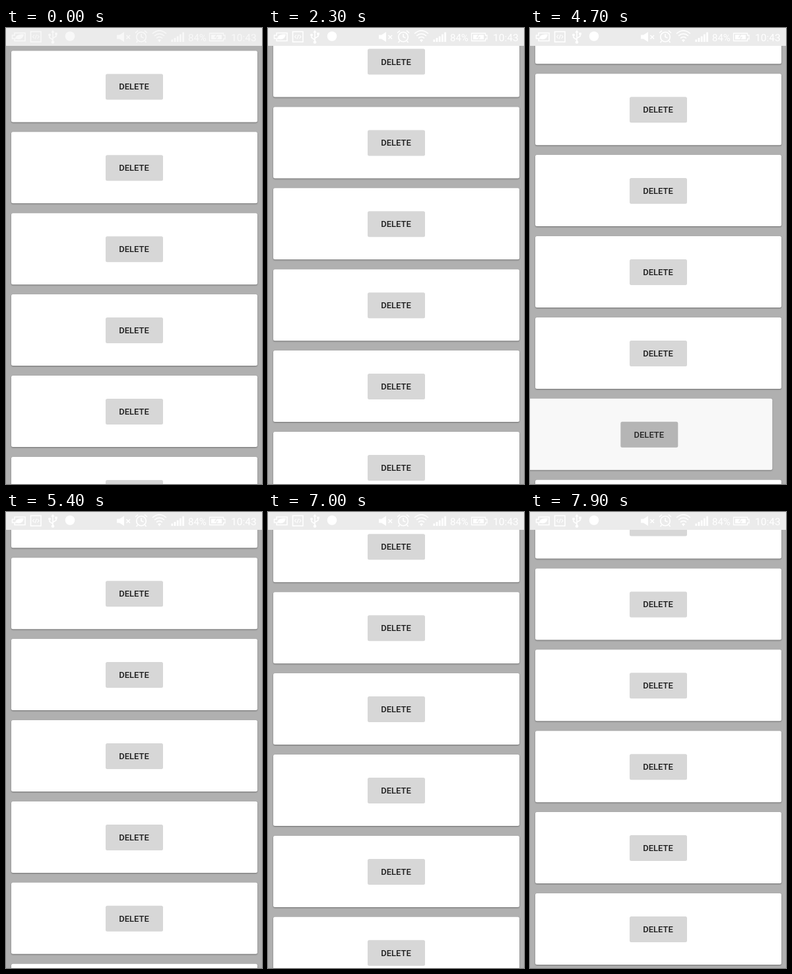
An HTML page that plays this animation: 388x690 px, repeating every 8 s.

```html
<!DOCTYPE html>
<html lang="en">
<head>
<meta charset="utf-8">
<title>Card list</title>
<style>
  html, body { margin: 0; width: 100%; height: 100%; overflow: hidden; background: #b0b0b0; }
  #stage { position: relative; width: 388px; height: 690px; overflow: hidden; background: #b0b0b0; }
  .card {
    --a: 1; --ink: 1; --grey: 215;
    position: absolute; left: 7.5px; top: 0; width: 373px; height: 108px; border-radius: 2.5px;
    background: rgba(255, 255, 255, var(--a));
    box-shadow: 0 1px 2px rgba(0, 0, 0, calc(var(--a) * .38));
  }
  .button {
    position: absolute; left: 143px; top: 34.8px; width: 87px; height: 39.5px; border-radius: 2.5px;
    background: rgba(var(--grey), var(--grey), var(--grey), var(--a));
    color: rgba(28, 28, 28, var(--ink));
    font: 500 13px/39.5px Roboto, sans-serif; text-align: center;
  }
  #bar { position: absolute; left: 0; top: 0; background: #ebebeb; }
  #bar text { font-family: Roboto, sans-serif; fill: #fff; stroke: none; }
</style>
</head>
<body>
<div id="stage">
  <div id="list"></div>
  <svg id="bar" width="388" height="27" viewBox="0 0 388 27">
    <g id="icons" fill="none" stroke="#fff" stroke-width="1.6">
      <!-- power saver -->
      <path d="M13 7.5H29V19.5H13V16H9.5V11H13Z"/>
      <path d="M14 17C14 11 19 9 27 9.500C26 16 21 18.500 16 16.500Z" fill="#fff" stroke="none"/>
      <!-- developer mode -->
      <rect x="37.500" y="5.500" width="15.500" height="15.500"/>
      <path d="M43 10.500L40.500 13.200L43 16M47.500 10.500L50 13.200L47.500 16M46.300 10L44.300 16.500" stroke-width="1.1"/>
      <!-- usb -->
      <path d="M71 6V21M71 18L66 14.500V11M71 15.500L76 12.500V9"/>
      <path d="M71 3L73.500 7H68.500Z" fill="#fff" stroke="none"/>
      <g fill="#fff" stroke="none">
        <circle cx="71" cy="21.500" r="2.300"/>
        <circle cx="66" cy="10.500" r="1.900"/>
        <rect x="74.300" y="7" width="3.500" height="3.500"/>
        <circle cx="97" cy="12.500" r="7.300"/>
        <!-- muted speaker -->
        <path d="M168 10.500H172L179 6V21L172 16.500H168Z"/>
      </g>
      <path d="M182.500 11L188 16.500M188 11L182.500 16.500"/>
      <!-- alarm -->
      <circle cx="205" cy="13.500" r="7.300"/>
      <path d="M205 9V13.500L208.500 15M196 7.500L200 4M214 7.500L210 4M199.500 19.500L197.500 22M210.500 19.500L212.500 22"/>
      <!-- wifi -->
      <path d="M222 8.500Q232.500 -.5 243 8.500M225 12Q232.500 5.500 240 12M228 15.500Q232.500 11.500 237 15.500"/>
      <path d="M230 18.300Q232.500 16 235 18.300L232.500 21.500Z" fill="#fff" stroke="none"/>
      <!-- signal -->
      <path d="M251.800 21V17.500M256 21V15M260.200 21V12.500M264.400 21V9.500M268.600 21V6.500" stroke-width="2.800"/>
      <!-- battery -->
      <path d="M308.500 8H329.500V11H332V16.500H329.500V19.500H308.500Z" stroke-width="1.300"/>
      <path d="M311 10.300H327V17.200H311Z" fill="#fff" stroke="none"/>
      <path d="M320 9.500L316.500 14H321L318 18" stroke="#ebebeb" stroke-width="1.200"/>
      <text x="276" y="19.500" font-size="15">84%</text>
      <text x="341" y="19.800" font-size="15.500">10:43</text>
    </g>
  </svg>
</div>
<script>
  const LOOP = 8000, TICK = 100, TOP = 34.4, PITCH = 122.9;
  const SLIDE = 250, SHIFT = -143.3;

  // Distance travelled in each tick of a fling
  const flings = [
    { start: 1600, steps: [11, 20, 25, 28, 28, 25, 23.8, 20, 15, 10, 5.2] },
    { start: 6700, steps: [14, 26, 30.9, 31, 28, 25, 22, 18, 14, 10.5, 7, 3.2] }
  ];
  const removals = [
    { card: 4, out: 3345, close: 3760 },
    { card: 7, out: 4650, close: 5150 },
    { card: 2, out: 5850, close: 6260 }
  ];

  const clamp = x => Math.min(1, Math.max(0, x));
  const ease = x => .5 - .5 * Math.cos(Math.PI * clamp(x));
  const scrollAt = t => flings.reduce((sum, f) =>
    sum + f.steps.reduce((s, d, i) => s + d * clamp((t - f.start) / TICK - i), 0), 0);

  const cards = Array.from({ length: 13 }, () => {
    const card = document.createElement('div');
    card.className = 'card';
    card.innerHTML = '<div class="button">DELETE</div>';
    document.getElementById('list').append(card);
    return card;
  });
  const icons = document.getElementById('icons');

  function draw(t) {
    const scroll = scrollAt(t);
    cards.forEach((card, i) => {
      let x = 0, y = TOP + PITCH * i - scroll, alpha = 1, grey = 215;
      for (const r of removals) {
        if (i > r.card) y -= PITCH * ease((t - r.close) / SLIDE);
        if (i === r.card && t > r.out - 46) {
          const p = ease((t - r.out) / SLIDE);
          x = SHIFT * p;
          alpha = 1 - p;
          grey = Math.round(79 + 106 * alpha);
        }
      }
      card.style.transform = `translate(${x}px, ${y}px)`;
      card.style.setProperty('--a', alpha.toFixed(3));
      card.style.setProperty('--ink', Math.pow(alpha, .6).toFixed(3));
      card.style.setProperty('--grey', grey);
    });
    icons.setAttribute('opacity', t < 2000 ? .65 : 1);
  }

  function frame() {
    const t = performance.now() % LOOP;
    draw(Math.floor(t / TICK) * TICK);
    requestAnimationFrame(frame);
  }
  frame();
</script>
</body>
</html>
```
